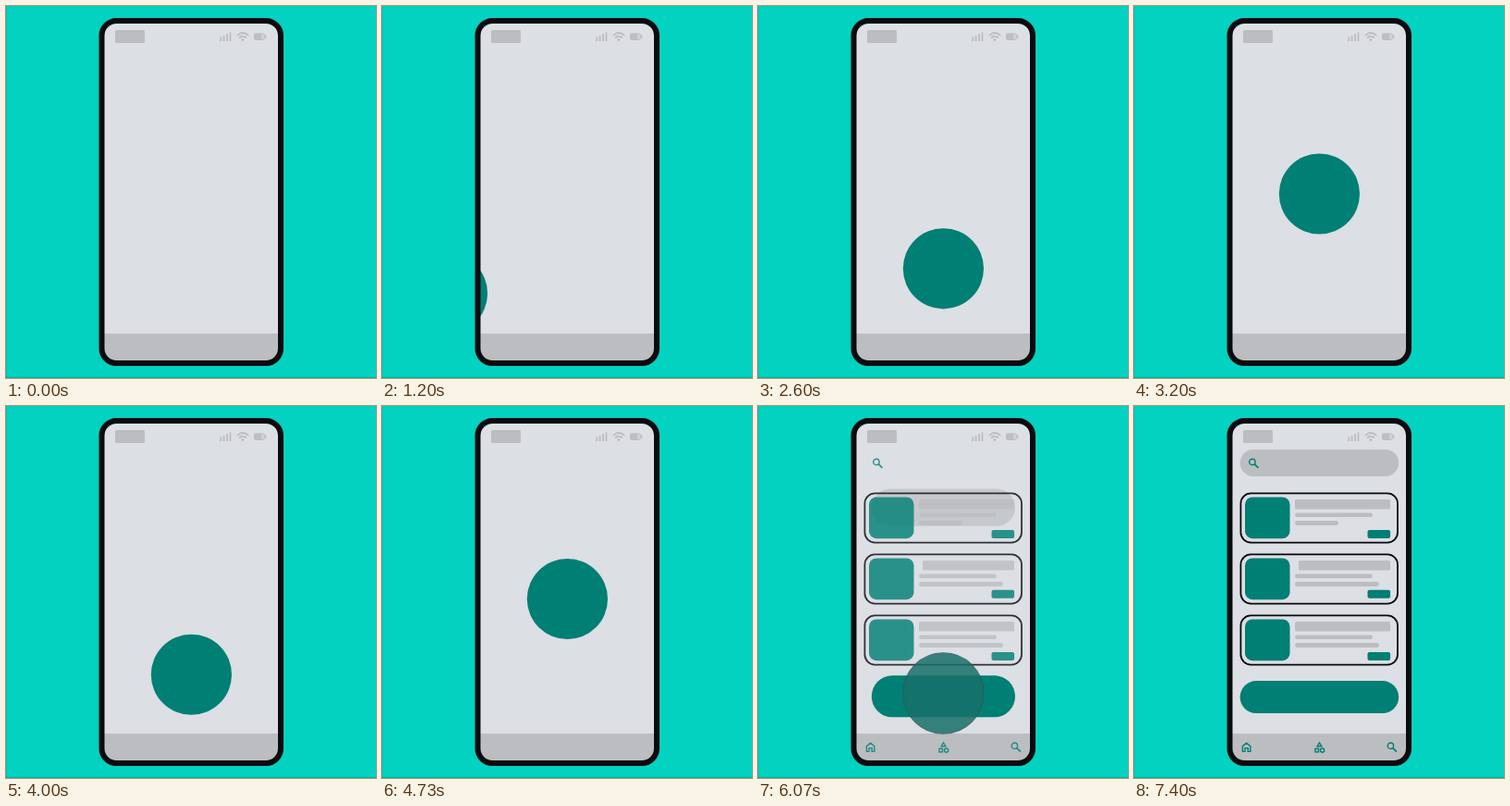
Animation, 400 px wide and 402 px high, one loop 8 s. Source, as an HTML page:

```html
<!DOCTYPE html>
<html lang="en">
<head>
<meta charset="utf-8">
<title>Bouncing ball to app screen</title>
<style>
  html, body { margin: 0; width: 100%; height: 100%; overflow: hidden; background: #02d2bf; }
  svg { display: block; width: 100vw; height: 100vh; }
  .teal { fill: #007f75; }
  .gray { fill: #bcbdc0; }
  .icon { fill: none; stroke: #007f75; stroke-width: 1.4; }
  .card { fill: none; stroke: #08080c; stroke-width: 1.8; }
</style>
</head>
<body>
<svg viewBox="0 0 400 402">
  <defs>
    <clipPath id="screen"><rect x="106" y="18.5" width="188.5" height="365" rx="13"/></clipPath>
    <g id="search" class="icon">
      <circle cx="3.9" cy="3.9" r="3.2"/>
      <path d="M6.3 6.3 10.4 10.4" stroke-width="1.7"/>
    </g>
  </defs>
  <rect width="400" height="402" fill="#02d2bf"/>
  <path d="M0 401.3H400" stroke="#007c70" stroke-opacity=".45"/>
  <path d="M.4 0V402" stroke="#007c70" stroke-opacity=".2"/>

  <g clip-path="url(#screen)">
    <rect x="100" y="13" width="200" height="376" fill="#dcdfe4"/>
    <rect class="gray" x="118" y="26" width="32" height="14" rx="1.5"/>
    <path d="M232.2 38v-4.5M235.6 38v-6M239 38v-8M242.5 38v-9.6" stroke="#bcbdc0" stroke-width="1.8"/>
    <g fill="none" stroke="#bcbdc0" stroke-width="1.7">
      <path d="M249.8 31.8Q256 26.2 262.2 31.8M252.2 34.5Q256 31 259.8 34.5"/>
    </g>
    <circle class="gray" cx="256" cy="36.6" r="1.4"/>
    <rect x="268.4" y="29.9" width="11.2" height="6.6" rx="1.6" fill="#d0d2d6" stroke="#bcbdc0"/>
    <rect class="gray" x="268.5" y="30" width="7.5" height="6.4" rx="1"/>
    <rect class="gray" x="280.2" y="31.8" width="1.4" height="2.8"/>
    <rect class="gray" x="100" y="354" width="200" height="35"/>

    <rect id="field" class="gray"/>
    <g id="cards"></g>
    <rect id="button" class="teal"/>
    <g id="icons">
      <use href="#search" x="124" y="56.5"/>
      <path class="icon" d="M117.4 367.6 121.6 364.2 125.8 367.6V373.4H123.2V369.6H120V373.4H117.4Z" stroke-width="1.3"/>
      <path class="icon" d="M200.5 363.8 202.9 367.7H198.1Z"/>
      <rect class="icon" x="195.9" y="370.3" width="3.6" height="3.6"/>
      <circle class="icon" cx="203.6" cy="372.1" r="2.1"/>
      <use href="#search" x="273.5" y="363.3"/>
    </g>
    <circle id="ball" r="43.6"/>
  </g>
  <rect x="103.5" y="16" width="193.5" height="370" rx="16" fill="none" stroke="#0b0b0f" stroke-width="6"/>
</svg>
<script>
const LOOP = 8000, FPS = 15;
const FLOOR = 310.5, APEX = 201, LEFT = 62, MID = 200.4, SIZE = 87.2;
const MOVE = 810, ROLL = 1170, BOUNCE = 2474, MORPH = 5780, MORPH_TIME = 460;

const $ = id => document.getElementById(id);
const set = (el, attrs) => { for (const k in attrs) el.setAttribute(k, attrs[k]); };
const mix = (a, b, p) => a + (b - a) * p;
const clamp = v => Math.min(1, Math.max(0, v));

// cubic-bezier(0, 0, .58, 1)
function easeOut(x) {
  if (x <= 0 || x >= 1) return clamp(x);
  let lo = 0, hi = 1;
  for (let i = 0; i < 24; i++) {
    const u = (lo + hi) / 2;
    if (1.74 * u * u - 0.74 * u * u * u < x) lo = u; else hi = u;
  }
  return lo * lo * (3 - 2 * lo);
}
const easeIn = x => 1 - easeOut(1 - x);

function addRect(cls, x, y, w, h, rx) {
  const el = document.createElementNS('http://www.w3.org/2000/svg', 'rect');
  set(el, { class: cls, x, y, width: w, height: h, rx });
  $('cards').append(el);
}

// top edge, title inset, second line width, tag offset
const cards = [[94, 0, 47, 40], [160, 4, 91, 38.7], [226, 0, 91, 40]];
for (const [y, inset, line, tag] of cards) {
  addRect('card', 115.4, y + 0.4, 169.6, 53.2, 11);
  addRect('teal', 120, y + 4.5, 48.5, 44.7, 8);
  addRect('gray', 174 + inset, y + 7, 103 - inset, 10.6, 1.5);
  addRect('gray', 174, y + 21.4, 84, 4.7, 2.3);
  addRect('gray', 174, y + 30.1, line, 4.8, 2.4);
  addRect('teal', 252.5, y + tag, 24.6, 9, 2);
}

// pill growing out of the ball's resting place
function placePill(el, cy, height, p, opacity) {
  const w = mix(SIZE, 171.6, p), h = mix(SIZE, height, p);
  set(el, { x: MID - w / 2, y: mix(FLOOR, cy, p) - h / 2, width: w, height: h, rx: h / 2, opacity });
}

function ballHeight(t) {
  const n = (t - BOUNCE) / MOVE;
  if (n <= 0 || n >= 4) return FLOOR;
  const part = n % 1;
  return Math.floor(n) % 2 ? mix(APEX, FLOOR, easeIn(part)) : mix(FLOOR, APEX, easeOut(part));
}

function draw(t) {
  const p = easeOut((t - MORPH) / MORPH_TIME);
  set($('ball'), {
    cx: mix(LEFT, MID, easeOut((t - ROLL) / MOVE)),
    cy: ballHeight(t),
    fill: `rgb(${30 * p},${127 - 18 * p},${117 - 13 * p})`,
    stroke: '#2a5f5c',
    'stroke-width': p > 0 ? 1.3 : 0,
    opacity: clamp((1 - p) * 4.4)
  });
  placePill($('field'), 61.5, 29, p, p * p);
  placePill($('button'), 314.6, 35, p, p > 0 ? 1 : 0);
  set($('cards'), { opacity: p });
  set($('icons'), { opacity: p });
}

const start = performance.now();
function tick() {
  const t = (performance.now() - start) % LOOP;
  draw(Math.floor((t + 5) * FPS / 1000) * 1000 / FPS);
  requestAnimationFrame(tick);
}
tick();
</script>
</body>
</html>
```
